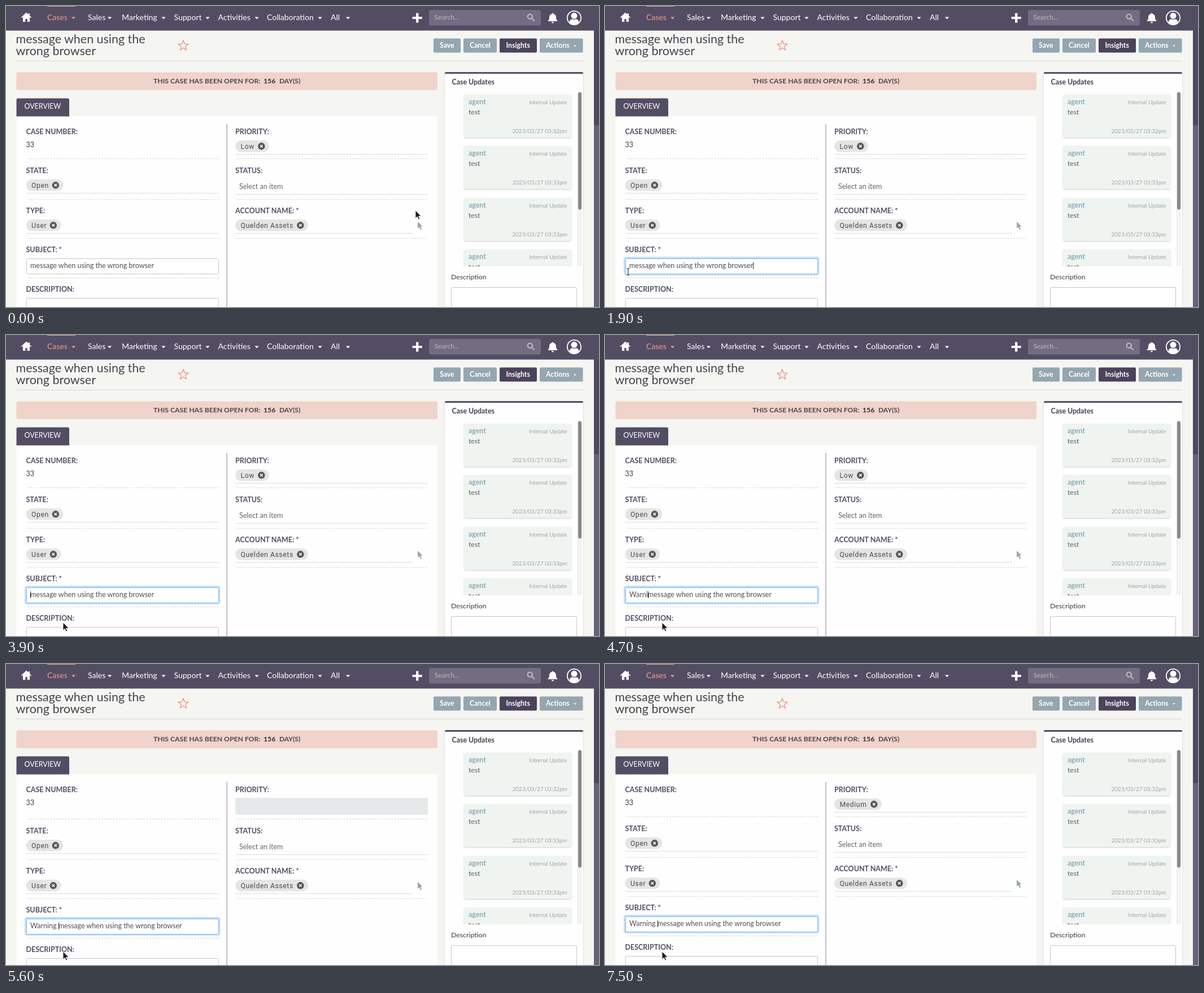
An HTML page for the animation above (8000 ms loop, 1050 by 533 pixels).

```html
<!DOCTYPE html>
<html lang="en">
<head>
<meta charset="utf-8">
<title>Case form</title>
<style>
html, body { margin: 0; width: 100%; height: 100%; overflow: hidden; background: #f5f5f2; }
svg { display: block; }
text { font-family: Lato, sans-serif; white-space: pre; }
.chip { font-family: Roboto, sans-serif; letter-spacing: .6px; }
</style>
</head>
<body>
<svg id="stage" width="1050" height="533" viewBox="0 0 1050 533"></svg>
<script>
const INK = '#534d64', STEEL = '#94a6b0', CORAL = '#f08a7a', PEACH = '#f29b8a';
const SUBJECT = 'message when using the wrong browser', PREFIX = 'Warning ';
const LOOP = 8000, STEP = 100;

const attrs = o => Object.entries(o).map(([k, v]) => `${k}="${v}"`).join(' ');
const rect = (x, y, w, h, fill, o = {}) =>
  `<rect x="${x}" y="${y}" width="${w}" height="${h}" fill="${fill}" ${attrs(o)}/>`;
const text = (x, y, s, size = 12.5, fill = INK, o = {}) =>
  `<text x="${x}" y="${y}" font-size="${size}" fill="${fill}" ${attrs(o)}>${s}</text>`;
const path = (d, fill, o = {}) => `<path d="${d}" fill="${fill}" ${attrs(o)}/>`;
const group = (id, body, o = {}) => `<g id="${id}" ${attrs(o)}>${body}</g>`;
const bold = { 'font-weight': 700 };

const label = (x, y, s) => text(x, y, s, 12.5, INK, bold);
const rule = (x, y, w) => rect(x, y, w, 1, '#dcdcdc');
const dots = (x, y, w) =>
  path(`M${x} ${y + .5}h${w}`, 'none', { stroke: '#96949c', 'stroke-dasharray': '1 4' });
const triangle = (x, y, r, fill) => path(`M${x - r} ${y}h${2 * r}l${-r} ${r}z`, fill);
const box = (x, y, w, h, o = {}) =>
  rect(x + .5, y + .5, w, h, '#fff', { stroke: '#c6c6c8', rx: 2, ...o });

function chip(x, y, w, s) {
  const cx = x + w - 13.7, cy = y + 10.3;
  return rect(x, y, w, 20.5, '#e5e5e3', { rx: 10.2 }) +
    text(x + 9.5, y + 15, s, 12.2, '#4c4b51', { class: 'chip' }) +
    `<circle cx="${cx}" cy="${cy}" r="6.2" fill="#55545c"/>` +
    path(`M${cx - 2.2} ${cy - 2.2}l4.4 4.4m0 -4.4l-4.4 4.4`, 'none', { stroke: '#fff', 'stroke-width': 1.5 });
}

function navBar() {
  const items = [['Cases', 73, 119.5], ['Sales', 145, 183.5], ['Marketing', 205, 279], ['Support', 297.5, 357],
    ['Activities', 375.5, 444], ['Collaboration', 462, 556], ['All', 575, 605.5]];
  return rect(0, 0, 1050, 43.5, INK) + rect(73, 0, 50, 1, '#f5a594') +
    items.map(([s, x, tx], i) => {
      const c = i ? '#fff' : PEACH;
      return text(x, 25, s, 14, c) + triangle(tx, 19.5, 3.7, c);
    }).join('') +
    path('M36 11.5L27 20l1 1.2L30 19.6V28h4.3v-5h3.4v5H42v-8.4l2 1.6 1-1.2-3-2.8V13h-2.4v2z', '#fff') +
    path('M728.2 12.5v17M719.7 21h17', 'none', { stroke: '#fff', 'stroke-width': 4.2 }) +
    rect(749, 7, 198, 27.5, '#726d80', { rx: 3 }) + text(758.5, 24, 'Search...', 12, '#bdbac4') +
    path('M927.8 14.5a4.2 4.2 0 1 0 .01 0M931 22l4.8 4.8', 'none', { stroke: '#bcb9c3', 'stroke-width': 2.1 }) +
    path('M968 12.5q1.3 0 1.3 1.5c3.4.7 4.7 3.3 4.7 6.5 0 3 .8 4 2.3 5.6v1h-16.6v-1c1.5-1.6 2.3-2.6 2.3-5.6 0-3.2 1.3-5.8 4.7-6.5q0-1.5 1.3-1.5zM965.8 28.3h4.4q-.4 2.2-2.2 2.2t-2.2-2.2z', '#fff') +
    '<circle cx="1006" cy="21" r="12.2" fill="none" stroke="#fff" stroke-width="1.8"/><circle cx="1006" cy="17.3" r="5.5" fill="#fff"/>' +
    path('M997.5 29.5q.5-6 5-6.3q3.5 1.6 7 0q4.500.3 5 6.300q-8.500 6.500-17 0z'.replace(/00(?=\D)/g, ''), '#fff') +
    rect(1041, 43, 9, 490, '#67627a') + rect(1041, 43, 9, 168, '#4f485f');
}

function heading() {
  const star = Array.from({ length: 10 }, (_, i) => {
    const a = i * Math.PI / 5, r = i % 2 ? 4 : 9.3;
    return `${314 + r * Math.sin(a)},${70.3 - r * Math.cos(a)}`;
  }).join(' ');
  const buttons = [['Save', 757, 48, 768], ['Cancel', 810, 59, 821], ['Insights', 874, 66, 885.5], ['Actions', 945, 76.5, 956]];
  return text(17.5, 66, 'message when using the', 21.45, '#45424c') + text(17.5, 87, 'wrong browser', 21.45, '#45424c') +
    `<polygon points="${star}" fill="none" stroke="${CORAL}" stroke-width="1.2"/>` +
    buttons.map(([s, x, w, tx]) => rect(x, 57.5, w, 25, s === 'Insights' ? '#4b435c' : STEEL, { rx: 2 }) +
      text(tx, 73.5, s, 12.3, '#fff', bold)).join('') +
    triangle(1007.5, 69.5, 2.5, '#fff') + rect(18, 97, 1004, 1, '#d6d6d6') +
    rect(18.5, 117.5, 745.5, 31.5, '#f0d3ca', { rx: 3 }) +
    text(261, 137, 'THIS CASE HAS BEEN OPEN FOR:', 12.2, '#4a4656', bold) +
    text(456, 137, '156', 12.2, '#2f2d36', bold) + text(484, 137, 'DAY(S)', 12, '#4a4656', bold);
}

function sidePanel() {
  const light = { 'font-weight': 300, 'text-anchor': 'end' };
  const card = i => {
    const y = Math.round(157 + i * 91.3);
    return rect(811, y, 190, 76, '#eff4f1', { rx: 3, filter: 'url(#shade)' }) +
      text(819, y + 17, 'agent', 12.4, '#8aacb8', bold) + text(819, y + 35, 'test', 12.2, '#5c5a63') +
      text(993.5, y + 17, 'Internal Update', 10, '#666', light) +
      text(993.5, y + 68, `2023/03/27 03:3${i ? 3 : 2}pm`, 10, '#666', light);
  };
  return rect(777, 117.5, 245, 420, '#fefefe', { rx: 3, filter: 'url(#shade)' }) +
    path('M777 120v-1q0-2 2-2h241q2 0 2 2v1z', INK) +
    text(789.5, 138.5, 'Case Updates', 12.4, '#45414f', bold) +
    `<g clip-path="url(#feed)">${[0, 1, 2, 3].map(card).join('')}</g>` +
    rect(1011, 152, 9, 309, '#f3f3f3', { rx: 4 }) + rect(1013, 152.5, 6, 208, '#88878c', { rx: 3 }) +
    text(788, 484, 'Description', 12.3, '#3f3c47') + box(788, 498, 222, 60, { rx: 1 });
}

function form() {
  const lower = dots(40, 270, 336) + dots(409, 270, 338) +
    label(35.5, 296, 'STATE:') + chip(35.5, 307, 66, 'Open') + rule(36, 331, 341) + dots(40, 342, 336) +
    label(406, 296, 'STATUS:') + text(413, 324, 'Select an item', 12.5, '#66636d') + rule(406, 333, 341) + dots(409, 342, 338) +
    label(35.5, 367, 'TYPE:') + chip(35.5, 378, 62, 'User') + rule(36, 402, 341) + dots(40, 411, 336) +
    label(406, 367, 'ACCOUNT NAME: *') + chip(406, 378, 129, 'Quelden Assets') + rule(406, 402, 314) + dots(409, 411, 338) +
    path('M729 382v12l2.7-2.5 2.5 5 2-1-2.5-5h4z', STEEL) +
    label(35.5, 436, 'SUBJECT: *') + dots(40, 481, 336) +
    rect(34.5, 445.5, 343.5, 30, 'none', { id: 'ring', rx: 3, stroke: '#c3dffa', 'stroke-width': 3 }) +
    box(36, 447, 340, 27, { id: 'field' }) + text(43, 464, '', 12.5, '#504d58', { id: 'subject' }) +
    rect(43, 454, 1, 12, '#222', { id: 'caret' }) +
    label(35.5, 506, 'DESCRIPTION:') + box(36, 517, 340, 40);
  return rect(18.5, 195, 745.5, 340, '#fefefe', { rx: 2 }) + path('M18.5 195.5v-29q0-3 3-3h87.5q3 0 3 3v29z', INK) +
    text(32.5, 182, 'OVERVIEW', 12.4, '#fff') + rect(390.5, 209, 1, 324, '#85828c') +
    label(35.5, 227, 'CASE NUMBER:') + text(35.5, 250, '33', 12.5, '#3a3741') + label(406, 227, 'PRIORITY:') +
    group('priority', rule(406, 262, 341) + group('low', chip(406, 238, 60, 'Low')) + group('medium', chip(406, 238, 84, 'Medium'))) +
    rect(406, 237, 341, 30, '#e5e9e9', { id: 'busy', rx: 2 }) + group('lower', lower);
}

const arrow = 'M0 0v14l3.2-2.9 2.4 5 2.2-1-2.4-4.9h4.6z';
const beam = 'M-2.5 -6q2.5 0 2.5 1.5v9q0 1.5 -2.5 1.5M2.5 -6q-2.5 0 -2.5 1.5v9q0 1.5 2.5 1.5';
const stage = document.getElementById('stage');
stage.innerHTML = `<defs>
  <clipPath id="feed"><rect x="800" y="150" width="211" height="311"/></clipPath>
  <filter id="shade" x="-5%" y="-10%" width="110%" height="125%"><feDropShadow dx="0" dy="1" stdDeviation="1.3" flood-opacity=".2"/></filter>
</defs>` + rect(0, 0, 1050, 533, '#f5f5f2') + heading() + form() + sidePanel() + navBar() +
  group('arrow', path(arrow, '#1c1c1c', { stroke: '#fff', 'stroke-width': .8 })) +
  group('beam', path(beam, 'none', { stroke: '#fff', 'stroke-width': 2.6 }) + path(beam, 'none', { stroke: '#222', 'stroke-width': 1.1 }));

const el = {};
stage.querySelectorAll('[id]').forEach(e => el[e.id] = e);
const show = (e, on) => e.setAttribute('display', on ? 'inline' : 'none');
const move = (e, x, y) => e.setAttribute('transform', `translate(${x} ${y})`);
const at = (list, t) => list.filter(k => k[0] <= t).pop();

const KEYS = [4000, 4200, 4300, 4500, 4700, 4800, 5000, 5100];
const CARET = [[0, 0], [1800, 1], [2400, 0], [2600, 1], [3300, 0], [3900, 1], [6000, 0], [6300, 1], [6900, 0], [7500, 1]];
const POINTER = [[0, 'arrow', 725, 362], [1000, 'beam', 40, 457], [1100, ''], [1300, 'arrow', 13, 464],
  [1400, 'beam', 45, 471], [1500, 'beam', 41, 470.5], [2400, 'beam', 38, 472], [2500, 'beam', 38, 466],
  [2600, 'beam', 39, 461.5], [3000, 'arrow', 101, 509]];

function pointer(t) {
  let [, kind, x = 0, y = 0] = at(POINTER, t);
  if (t >= 500 && t < 1000) {
    const u = (t - 400) / 600, s = u * u * (3 - 2 * u);
    x -= 685 * s;
    y += 84 * s;
  }
  for (const name of ['arrow', 'beam']) {
    show(el[name], kind === name);
    move(el[name], x, y);
  }
}

function draw(t) {
  const typed = KEYS.filter(k => k <= t).length;
  const focus = Math.max(0, Math.min(1, (t - 1700) / 200));
  const busy = t >= 5600 && t < 6000;
  const fade = Math.max(0, Math.min(1, .3 + (t - 6000) / 300 * .7));

  el.subject.textContent = PREFIX.slice(0, typed) + SUBJECT;
  const pos = t < 2500 ? SUBJECT.length : typed;
  el.caret.setAttribute('x', Math.round(43 + (pos ? el.subject.getSubStringLength(0, pos) : 0)));
  show(el.caret, at(CARET, t)[1]);
  el.ring.setAttribute('opacity', focus);
  el.field.setAttribute('stroke', focus ? '#7db8ee' : '#c6c6c8');

  show(el.priority, !busy);
  show(el.busy, busy);
  show(el.low, t < 5600);
  show(el.medium, t >= 6000);
  el.medium.setAttribute('opacity', fade);
  move(el.medium, 0, -8.5 * (1 - fade));
  move(el.lower, 0, busy ? 4 : 0);
  pointer(t);
}

const start = performance.now();
function tick() {
  const t = (performance.now() - start) % LOOP;
  draw(Math.floor(t / STEP) * STEP);
  requestAnimationFrame(tick);
}
tick();
</script>
</body>
</html>
```
